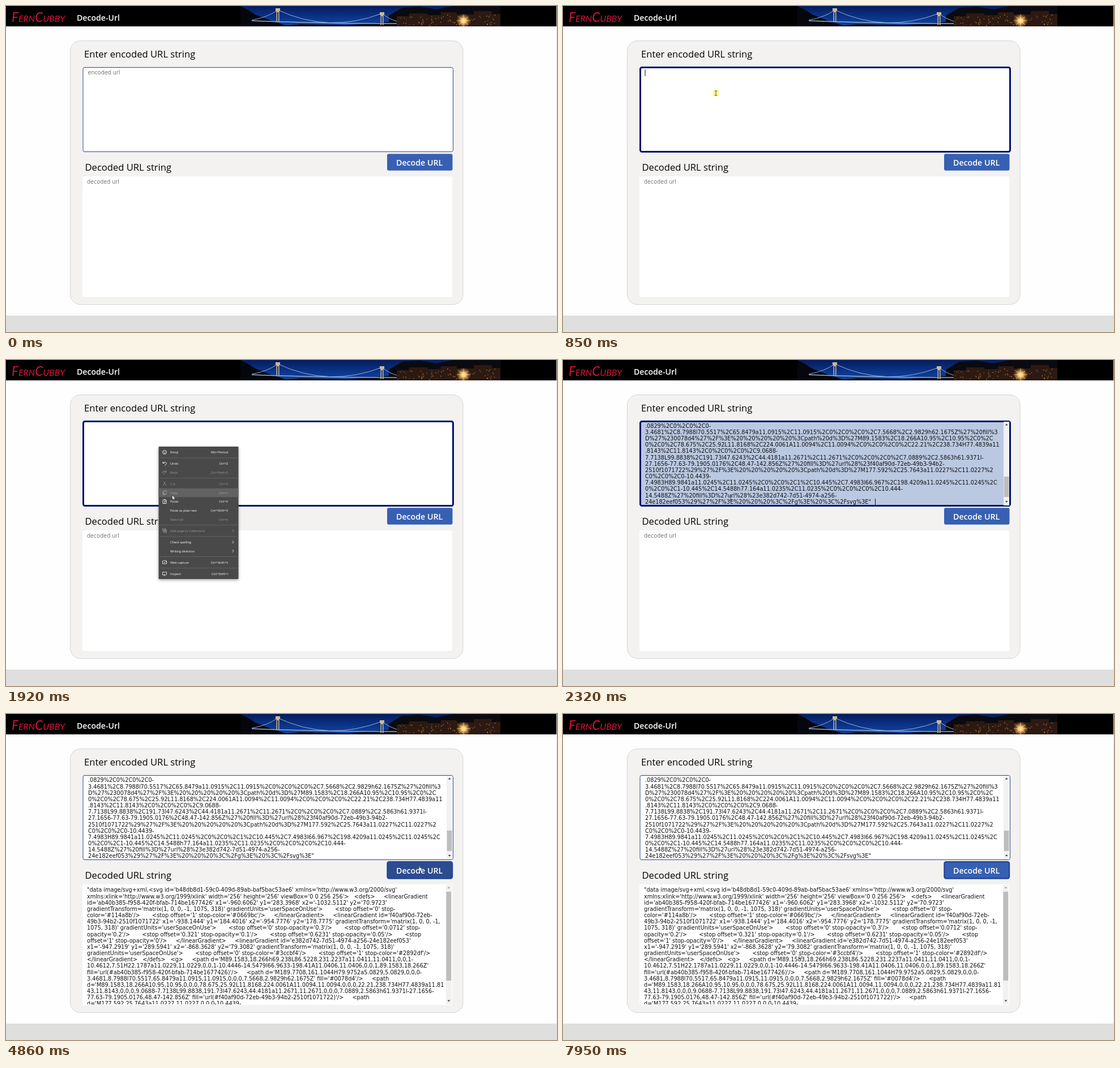
These frames come from a looping animation (973 px wide and 576 px high, 8 s). An HTML page:

```html
<!DOCTYPE html>
<html lang="en">
<head>
<meta charset="utf-8">
<title>Decode-Url</title>
<style>
html, body { margin: 0; width: 100%; height: 100%; overflow: hidden; background: #fff }
svg { display: block; width: 973px; height: 576px; font-family: "Open Sans", "Noto Sans", sans-serif }
text { white-space: pre }
.body { font: 9.7px "DejaVu Sans", sans-serif; fill: #111 }
.hint { font: 9.6px "DejaVu Sans", sans-serif; fill: #777 }
.menu { font-size: 5.6px; fill: #fff }
.dim { opacity: .45 }
.icon { fill: none; stroke: #fff; stroke-width: .8 }
</style>
</head>
<body>
<svg viewBox="0 0 973 576">
  <defs>
    <linearGradient id="sky" x2="0" y2="1">
      <stop stop-color="#061c5c"/><stop offset=".7" stop-color="#0d3a94"/><stop offset="1" stop-color="#123f8c"/>
    </linearGradient>
    <radialGradient id="glow">
      <stop stop-color="#fff6d0"/><stop offset=".3" stop-color="#ffc86e"/><stop offset="1" stop-color="#b86a20" stop-opacity="0"/>
    </radialGradient>
    <clipPath id="inClip"><path d="M137 109H788V257H137z"/></clipPath>
    <clipPath id="outClip"><path d="M136 302H788V513H136z"/></clipPath>
    <clipPath id="photoClip"><path d="M414 0H873V36H414z"/></clipPath>
    <filter id="shadow" x="-10%" y="-10%" width="120%" height="120%">
      <feDropShadow dx="0" dy="2" stdDeviation="2.5" flood-opacity=".35"/>
    </filter>
  </defs>

  <path fill="#fefefe" d="M0 0H973V576H0z"/>
  <path fill="#dfdfdd" d="M0 547H973V576H0z"/>
  <path fill="#000" d="M0 0H972V36H0z"/>
  <path stroke="#e2e2e2" d="M972.5 0V547"/>

  <g clip-path="url(#photoClip)">
    <path fill="url(#sky)" d="M414 0H873V36H414z"/>
    <path fill="#05070d" d="M414 0V36H500L468 26 440 15 428 7z"/>
    <path fill="#080b14" d="M480 36L520 32 600 34 690 27V36z"/>
    <path fill="#0a0a10" d="M676 36V17L700 3 730 1 760 6 790 0H873V36z"/>
    <path fill="#2c1a12" d="M690 36V18H712V13H744V16H768V11H796V15H826V9H858V14H873V36z"/>
    <g fill="none" stroke="#a9bede" stroke-width=".9">
      <path d="M434 25Q462 20 480 7Q570 49 664 13Q674 22 690 27"/>
      <path stroke="#8fb0d8" stroke-width="1.4" d="M434 26Q560 31 690 31"/>
    </g>
    <path id="tower" fill="#c9b99a" d="M476 4h8v5h-1.5v18h-1.5V11h-2v16h-1.5V9H476z"/>
    <use href="#tower" x="184" y="7"/>
    <g id="lights" fill="#d99a4a"></g>
    <circle cx="808" cy="26" r="13" fill="url(#glow)"/>
    <path stroke="#ffe2a0" stroke-width=".7" d="M796 26H820M808 15V36M800 19L816 33M816 19L800 33"/>
  </g>
  <text x="10" y="28" fill="#d4143c" style="font:italic small-caps 22.5px Lato,sans-serif">FernCubby</text>
  <text x="125" y="26" font-size="14.1" font-weight="600" fill="#fff">Decode-Url</text>

  <rect x="113.5" y="61.5" width="693.5" height="466" rx="18" fill="#f3f2f1" stroke="#d4d4d4"/>
  <text x="138" y="90.5" font-size="16.6" font-weight="500">Enter encoded URL string</text>
  <text x="139.5" y="291.2" font-size="16.6" font-weight="500">Decoded URL string</text>

  <rect id="inBox" rx="3"/>
  <text id="inHint" class="hint" x="144.5" y="121">encoded url</text>
  <g id="inText" clip-path="url(#inClip)"></g>
  <path id="caret" stroke="#111" stroke-width="1"/>

  <rect x="135" y="301" width="653" height="213" rx="3" fill="#fff"/>
  <text id="outHint" class="hint" x="143" y="314">decoded url</text>
  <g id="outText" clip-path="url(#outClip)"></g>

  <rect id="button" rx="3"/>
  <text x="689" y="281.8" font-size="14.2" font-weight="600" fill="#fff">Decode URL</text>

  <g id="menu"></g>

  <g id="cursor">
    <circle id="halo" r="6" fill="#ffff5c" opacity=".75"/>
    <path id="beam" fill="none" stroke="#444" stroke-width=".9" d="M-2.5 -4H2.5M0 -4V4M-2.5 4H2.5"/>
    <path id="arrow" fill="#fff" stroke="#222" stroke-width=".6" d="M0 0V8L1.9 6.3 3.2 9.1 4.4 8.5 3.2 5.8H5.8z"/>
    <path id="hand" fill="#fff" stroke="#222" stroke-width=".6" d="M-.8 .8Q0 -.5 .8 .8V3.4L3.6 4.2Q4.3 4.6 4 6L3.3 9H-.8L-3 5.6Q-2.8 4.5 -1.8 5.2L-.8 6z"/>
  </g>
</svg>
<script>
const LOOP = 8000, PITCH = 11.17;
const FOCUS = 780, MENU = 1050, MENU_END = 2190, PASTE = 2320, CLICK = 4260, DECODE = 4460;
const el = Object.fromEntries([...document.querySelectorAll("[id]")].map(e => [e.id, e]));

// Line ends wrap the lower box. In the upper box ^ starts the visible part,
// | wraps a line and ~ wraps inside the escape of the next character.
const markup = `"data image/svg+xml,<svg id='b48db8d1-59c0-409d-89ab-baf5bac53ae6' xmlns='http://www.w3.org/2000/svg'
xmlns:xlink='http://www.w3.org/1999/xlink' width='256' height='256' viewBox='0 0 256 256'>   <defs>     <linearGradient
id='ab40b385-f958-420f-bfab-714be1677426' x1='-960.6062' y1='283.3968' x2='-1032.5112' y2='70.9723'
gradientTransform='matrix(1, 0, 0, -1, 1075, 318)' gradientUnits='userSpaceOnUse'>       <stop offset='0' stop-
color='#114a8b'/>       <stop offset='1' stop-color='#0669bc'/>     </linearGradient>     <linearGradient id='f40af90d-72eb-
49b3-94b2-2510f1071722' x1='-938.1444' y1='184.4016' x2='-954.7776' y2='178.7775' gradientTransform='matrix(1, 0, 0, -1,
1075, 318)' gradientUnits='userSpaceOnUse'>       <stop offset='0' stop-opacity='0.3'/>       <stop offset='0.0712' stop-
opacity='0.2'/>       <stop offset='0.321' stop-opacity='0.1'/>       <stop offset='0.6231' stop-opacity='0.05'/>       <stop
offset='1' stop-opacity='0'/>     </linearGradient>     <linearGradient id='e382d742-7d51-4974-a256-24e182eef053'
x1='-947.2919' y1='289.5941' x2='-868.3628' y2='79.3082' gradientTransform='matrix(1, 0, 0, -1, 1075, 318)'
gradientUnits='userSpaceOnUse'>       <stop offset='0' stop-color='#3ccbf4'/>       <stop offset='1' stop-color='#2892df'/>
</linearGradient>   </defs>   <g>     <path d='M89.1583,18.266h69.238L86.5228,231.2237a11.0411,11.0411,0,0,1-
10.4612,7.51H22.1787a11.0229,11.0229,0,0,1-10.4446-14.5479l66.9633-198.41A11.0406,11.0406,0,0,1,89.1583,18.266Z'
fill='url(#ab40b385-f958-420f-bfab-714be1677426)'/>     <path d='M189.7708,161.1044H79.9752a5.0829,5^.0829,0,0,0-|
3.4681,8.7988l70.5517,65.8479a11.0915,11.0915,0,0,0,7.5668,2.9829h62.1675Z' fill~='#0078d4'/>     <path${" "}
d='M89.1583,18.266A10.95,10.95,0,|0,0,78.675,25.92L11.8168,224.0061A11.0094,11.0094,0,0,0,22.21,238.734H77.4839a11|.81
43,11.8143,0,0,0,9.0688-|7.7138L99.8838,191.73l47.6243,44.4181a11.2671,11.2671,0,0,0,7.0889,2.5863h61.9371l-|27.1656-
77.63-79.1905.0176,48.47-142.856Z' fill='url(#f40af90d-72eb-49b3-94b2-|2510f1071722)'/>     <path${" "}
d='M177.592,25.7643a11.0227,11.0227~,0,0,0-10.4439-|
7.4983H89.9841a11.0245,11.0245,0,0,1,10.445,7.4983l66.967,198.4209a11.0245,11.0245,|
0,0,1-10.445,14.5488h77.164a11.0235,11.0235,0,0,0,10.444-|14.5488Z' fill='url(#e382d742-7d51-4974-a256-|
24e182eef053)'/>   </g> </svg>"`;

const escapeChar = m => {
  const [a, b] = m.at(-1).charCodeAt(0).toString(16).toUpperCase();
  return "%" + a + (m.length > 1 ? "\n" : "") + b;
};
const decoded = markup.replace(/[|~^]/g, "").split("\n").slice(0, 19);
const encoded = markup.split("^")[1].replace(/\n/g, "").replace(/\|/g, "\n")
  .replace(/~?[^\w.\n"-]/g, escapeChar).split("\n");

const lines = (list, x, y) => list.map((line, i) =>
  `<text class="body" x="${x}" y="${y + i * PITCH}">${line.replace(/</g, "&lt;")}</text>`).join("");

const scrollbar = (x, top, bottom, thumb, size, up) => `
  <path fill="#f1f1f1" d="M${x} ${top}h10V${bottom}h-10z"/>
  <path fill="#bdbdbd" d="M${x + .7} ${thumb}h8.8v${size}h-8.8z"/>
  <path fill="${up}" d="M${x + 2.7} ${top + 6.5}h5l-2.5-3z"/>
  <path fill="#444" d="M${x + 2.7} ${bottom - 8}h5l-2.5 3z"/>`;

el.inText.innerHTML = `<g id="inBody">${lines(encoded, 145, 119.7)}</g>` + scrollbar(778, 109, 257, 206, 36, "#444");
el.outText.innerHTML = lines(decoded, 143, 314.4) + scrollbar(776.7, 301.5, 513.5, 314, 157, "#aaa");
const inBody = document.getElementById("inBody");

// label, shortcut (">" draws a chevron), y, dimmed, icon around its own centre
const items = [
  ["Emoji", "Win+Period", 163, 0, "M-3.5 0a3.5 3.5 0 1 0 7 0a3.5 3.5 0 1 0-7 0M-1.7 .8Q0 2.7 1.7 .8M-1.2-1.5v1M1.2-1.5v1"],
  ["Undo", "Ctrl+Z", 183, 0, "M-3-3.5V-.5H0M-3-.5Q0-4 2.5-2T0 3.5"],
  ["Redo", "Ctrl+Shift+Z", 198.7, 1, "M3-3.5V-.5H0M3-.5Q0-4-2.5-2T0 3.5"],
  ["Cut", "Ctrl+X", 218.7, 1, "M-2-3.5L2 2M2-3.5L-2 2M-3 2.5h1.5M1.5 2.5h1.5"],
  ["Copy", "Ctrl+C", 234.5, 1, "M-1.5-3.5h4.5v6h-4.5zM-3-2v5.5h4.5"],
  ["Paste", "Ctrl+V", 250, 0, "M-3-2.8h6v6.3h-6zM-1.2-3.6h2.4M0-.5h3M0-.5v4"],
  ["Paste as plain text", "Ctrl+Shift+V", 266, 0, ""],
  ["Select all", "Ctrl+A", 281.7, 1, ""],
  ["Add page to Collections", ">", 301.5, 1, "M-3.5-3.5h5v4h-5zM-1.5-1.5h5v5h-5zM1-.5v3M-.5 1h3"],
  ["Check spelling", ">", 321.7, 0, ""],
  ["Writing direction", ">", 337.5, 0, ""],
  ["Web capture", "Ctrl+Shift+S", 357.5, 0, "M-3.5-2.5h2l1-1h2l1 1h1v5h-7zM-1.5 1L3-2"],
  ["Inspect", "Ctrl+Shift+I", 377.8, 0, "M0 2h-3.5v-5h7v5M0 0v3.5l2-1.5"]
];
el.menu.innerHTML = `
  <rect x="269.5" y="153" width="141" height="234" rx="1" fill="#4a4a4a" filter="url(#shadow)"/>
  <path stroke="#686868" stroke-width=".8" d="${[173, 208.7, 291.7, 311.7, 347.5, 367.7].map(y => `M269.5 ${y}h141`).join("")}"/>
  <rect id="row" x="269.5" width="141" height="15.6" fill="#626262"/>` +
  items.map(([label, key, y, dim, icon]) => `<g class="menu ${dim ? "dim" : ""}">
    <path class="icon" d="${icon}" transform="translate(280 ${y})"/>
    <text x="290" y="${y + 2}">${label}</text>
    ${key === ">" ? `<path class="icon" d="M399.5 ${y - 2.5}l2.5 2.5-2.5 2.5"/>`
                  : `<text x="392" y="${y + 2}" text-anchor="end">${key}</text>`}</g>`).join("");
const row = document.getElementById("row");

let seed = 7;
const rnd = () => (seed = seed * 16807 % 2147483647) / 2147483647;
el.lights.innerHTML = Array.from({ length: 80 }, () =>
  `<rect x="${692 + rnd() * 178}" y="${15 + rnd() * 19}" width="1.5" height="1.6" opacity="${.2 + rnd() * .6}"/>`).join("");

// pointer moves: start, end, x, y reached
const moves = [
  [70, 710, 270, 154], [1380, 2050, 296, 248], [2190, 2250, 296, 244], [2720, 2920, 296, 163],
  [3530, 3860, 729, 263], [3860, 3990, 730, 268], [4860, 5270, 228, 336], [5600, 5940, 289, 320],
  [6140, 6210, 250, 310], [6410, 7210, 369, 320], [7280, 7950, 417, 424]
];
function pointer(t) {
  let x = 917, y = 532;
  for (const [from, to, px, py] of moves) {
    const u = Math.min(1, Math.max(0, (t - from) / (to - from))), e = u * u * (3 - 2 * u);
    x += (px - x) * e;
    y += (py - y) * e;
  }
  return [x, y];
}

const show = (e, on) => e.style.display = on ? "" : "none";
const set = (e, attrs) => { for (const k in attrs) e.setAttribute(k, attrs[k]); };
const within = (t, a, b) => t >= a && t < b;
const inside = (x, y, l, t, r, b) => within(x, l, r) && within(y, t, b);

function draw(t) {
  const [x, y] = pointer(t);
  const menu = within(t, MENU, MENU_END), focused = within(t, FOCUS, CLICK), pasted = t >= PASTE;
  const overInput = !menu && inside(x, y, 135, 107, 790, 258);
  const overButton = inside(x, y, 673, 261, 789, 291);

  set(el.inBox, focused
    ? { x: 136.5, y: 108.5, width: 653, height: 149, stroke: "#00126b", "stroke-width": 3 }
    : { x: 136, y: 108.5, width: 653.5, height: 149, stroke: "#2f4488", "stroke-width": 1 });
  set(el.inBox, { fill: pasted && overInput ? "#bac8e1" : "#fff" });
  show(el.inHint, t < FOCUS);
  show(el.inText, pasted);
  set(inBody, { transform: `translate(0 ${focused ? 0 : .7})` });

  show(el.caret, focused && (t < 1400 || within(t, 1930, 2790) || within(t, 3320, 3850)));
  set(el.caret, { d: pasted ? "M551.5 245V256" : "M145 112V124" });

  set(el.button, t >= CLICK
    ? { x: 673.5, y: 261.2, width: 114.5, height: 29.3, stroke: "#24469a", "stroke-width": 2.4 }
    : { x: 673, y: 261.3, width: 115.5, height: 29.5, stroke: "none" });
  set(el.button, { fill: overButton ? "#2c4c8e" : "#3860b2" });
  show(el.outHint, t < DECODE);
  show(el.outText, t >= DECODE);

  show(el.menu, menu);
  el.menu.style.opacity = Math.min(1, (t - MENU) / 140);
  const hovered = items.find(it => Math.abs(it[2] - y - 1) < 7.8);
  show(row, hovered && t > 1400);
  if (hovered) set(row, { y: hovered[2] - 7.8 });

  show(el.cursor, t >= 70);
  set(el.cursor, { transform: `translate(${x} ${y})` });
  show(el.halo, within(t, FOCUS, MENU) || within(t, 2120, MENU_END) || within(t, CLICK, 4400));
  show(el.beam, overInput);
  show(el.hand, overButton);
  show(el.arrow, !overInput && !overButton);
}

const start = performance.now();
function tick() {
  draw((performance.now() - start) % LOOP);
  requestAnimationFrame(tick);
}
tick();
</script>
</body>
</html>
```
